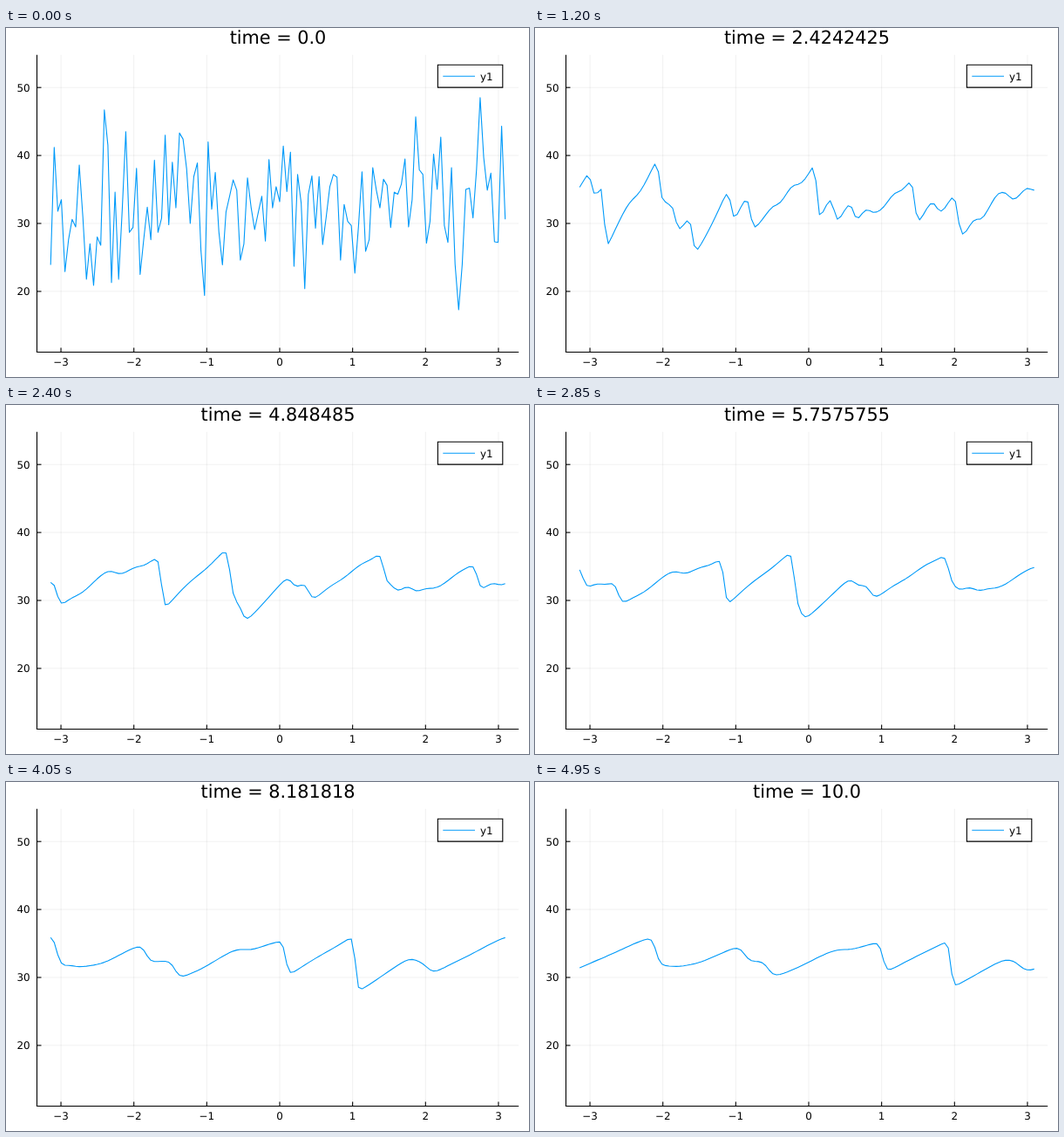
Animation of 600 by 400 pixels, one loop 5000 ms. Source, as an HTML page:

```html
<!DOCTYPE html>
<html lang="en">
<head>
<meta charset="utf-8">
<title>Wave steepening</title>
<style>
  html, body { margin: 0; width: 100%; height: 100%; overflow: hidden; background: #fff; }
  svg { display: block; }
  text {
    font-family: "DejaVu Sans", sans-serif; font-size: 11.9px; fill: #000;
    text-rendering: geometricPrecision;
  }
  #title { font-size: 20.8px; text-anchor: middle; }
  .grid { stroke: #000; stroke-opacity: .1; stroke-width: .6; }
  .axis { stroke: #000; stroke-width: 1.1; fill: none; }
  .wave { stroke: #009af9; stroke-width: 1.1; stroke-linejoin: round; fill: none; }
</style>
</head>
<body>
<svg width="600" height="400" viewBox="0 0 600 400">
  <g id="ticks"></g>
  <path class="axis" d="M35.5 30.8V371.5H588.2"/>
  <path id="wave" class="wave"/>
  <path class="axis" style="fill:#fff" d="M495.4 42.3H569.8V68.1H495.4Z"/>
  <path class="wave" d="M501.3 55.2H538"/>
  <text x="544" y="59.6">y1</text>
  <text id="title" x="312" y="18"></text>
</svg>
<script>
const FRAMES = 100, STEP_MS = 50;
const CELLS = 128, FINE = 4, N = CELLS * FINE;
const DT = Math.fround(10 / 99), SUBSTEPS = 24;
const DX = 2 * Math.PI / N;
const SCALE = 64, MEAN = 32, VISCOSITY = 0.001;

const px = x => 314 + x * 83.65;
const py = u => 224 - (u - 30) * 7.79;
const wrap = (i, n) => ((i % n) + n) % n;

// Initial condition; everything later follows from the equation
const noise = [
  23.9, 41.2, 31.8, 33.5, 22.9, 27.6, 30.6, 29.5, 38.6, 31, 21.8, 27, 20.9, 28, 26.8, 46.7,
  41.5, 21.3, 34.6, 21.8, 32, 43.5, 28.7, 29.4, 38.1, 22.5, 27.6, 32.4, 27.6, 39.3, 28.7, 30.8,
  43, 29.8, 39, 32.3, 43.3, 42.4, 38, 30, 36.9, 38.9, 26, 19.4, 42, 32.1, 37.5, 28.8,
  23.9, 31.7, 34, 36.4, 34.9, 24.6, 27, 36.7, 32.4, 29.1, 31.6, 34, 27.4, 39.4, 32.3, 35.4,
  33.2, 41.4, 34.7, 40.5, 23.7, 37.2, 33, 20.4, 34.3, 37, 29.3, 36.9, 26.9, 31, 35.4, 37.2,
  36.8, 24.6, 32.8, 30.3, 29.7, 22.7, 29.5, 37.6, 25.9, 27.6, 38.2, 34.9, 32.3, 36.5, 35.6, 29.4,
  34.6, 34.3, 35.8, 39.5, 29.5, 33.5, 45.7, 37.9, 37.2, 27.1, 30.3, 40.2, 35, 42.7, 29.7, 27.2,
  38.2, 24, 17.3, 24, 35, 35.2, 30.8, 38, 48.5, 39.7, 34.9, 37.4, 27.3, 27.2, 44.3, 30.6];

// Periodic linear interpolation
function sample(u, pos) {
  const i = Math.floor(pos), f = pos - i;
  return u[wrap(i, u.length)] * (1 - f) + u[wrap(i + 1, u.length)] * f;
}

// One frame of the viscous Burgers equation, seen from a frame moving at the mean speed
function advance(u) {
  const dt = DT / SUBSTEPS;
  for (let s = 0; s < SUBSTEPS; s++) {
    const old = u;
    u = old.map((c, i) => {
      const l = old[(i + N - 1) % N], r = old[(i + 1) % N];
      const flux = ((r - MEAN) ** 2 - (l - MEAN) ** 2) / (4 * SCALE * DX);
      return c + dt * (VISCOSITY * (l - 2 * c + r) / (DX * DX) - flux);
    });
  }
  return u;
}

function solve() {
  const rows = [];
  let u = Float64Array.from({ length: N }, (_, i) => sample(noise, i / FINE));
  for (let k = 0; k < FRAMES; k++) {
    const shift = MEAN / SCALE * k * DT / DX;
    rows.push(noise.map((_, j) => sample(u, j * FINE - shift)));
    u = advance(u);
  }
  return rows;
}

// Shortest decimal that is the same single-precision number
function shortest(value) {
  const f = Math.fround(value);
  let digits = 1;
  while (Math.fround(+f.toPrecision(digits)) !== f) digits++;
  const text = String(+f.toPrecision(digits));
  return text.includes(".") ? text : text + ".0";
}

function drawTicks() {
  let out = "";
  for (let x = -3; x <= 3; x++) {
    const p = px(x).toFixed(2);
    out += `<path class="grid" d="M${p} 30.8V371.5"/><path class="axis" d="M${p} 371.5v-5"/>
      <text x="${p}" y="387.3" text-anchor="middle">${String(x).replace("-", "\u2212")}</text>`;
  }
  for (let u = 20; u <= 50; u += 10) {
    const p = py(u).toFixed(2);
    out += `<path class="grid" d="M35.5 ${p}H588.2"/><path class="axis" d="M35.5 ${p}h5"/>
      <text x="27.6" y="${+p + 4.3}" text-anchor="end">${u}</text>`;
  }
  document.getElementById("ticks").innerHTML = out;
}

drawTicks();
const paths = solve().map(row => "M" + row.map((u, j) =>
  px(-Math.PI + j * 2 * Math.PI / CELLS).toFixed(2) + " " + py(u).toFixed(2)).join("L"));
const wave = document.getElementById("wave");
const title = document.getElementById("title");
const begin = performance.now();
let shown = -1;

function tick(now) {
  const k = Math.floor(Math.max(0, now - begin) / STEP_MS) % FRAMES;
  if (k !== shown) {
    shown = k;
    wave.setAttribute("d", paths[k]);
    title.textContent = "time = " + shortest(k * DT);
  }
  requestAnimationFrame(tick);
}
tick(begin);
</script>
</body>
</html>
```
